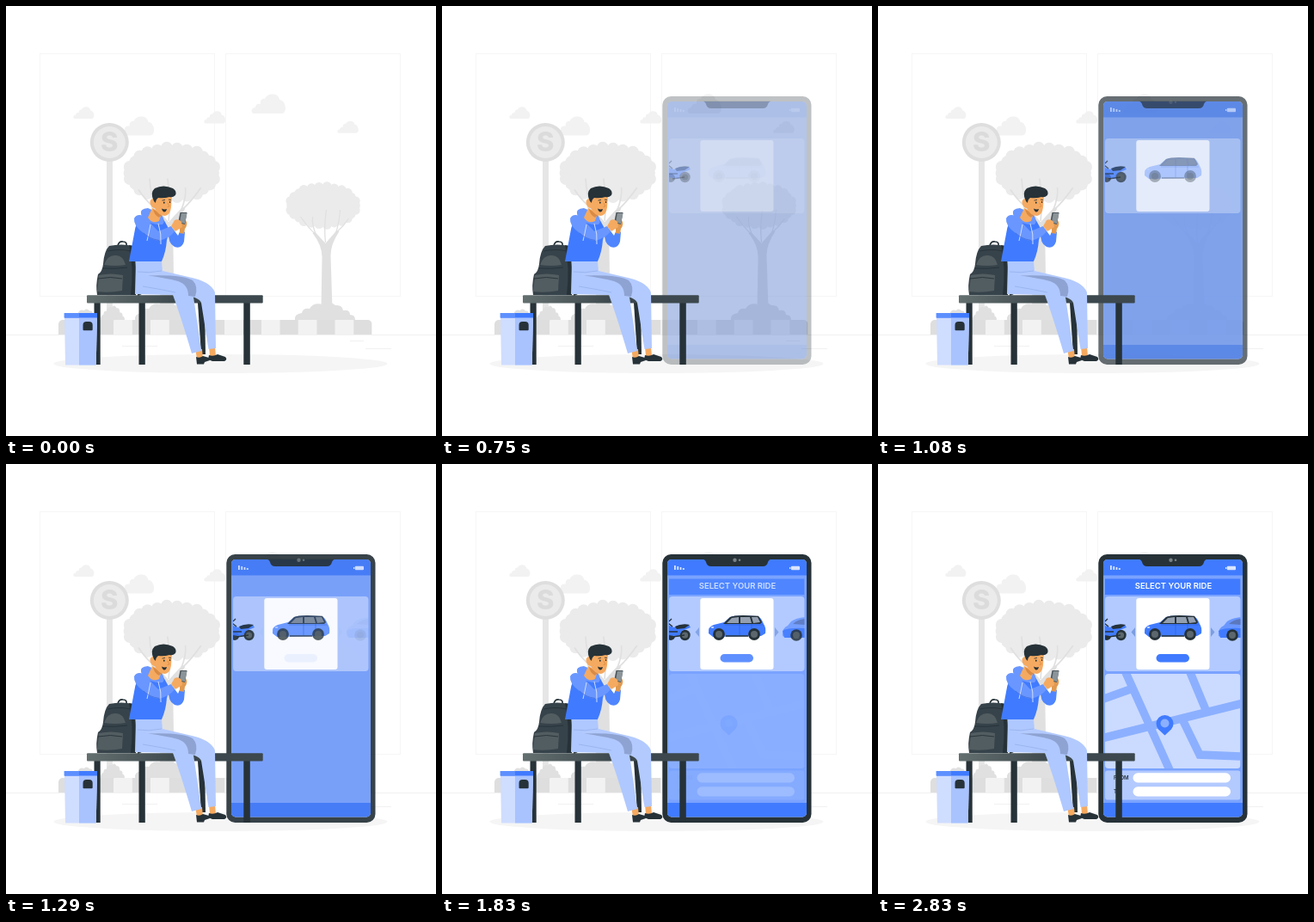
An HTML page with a canvas that plays this animation: 500 px wide and 500 px high, repeating every 3000 ms.

```html
<!DOCTYPE html>
<html lang="en">
<head>
<meta charset="utf-8">
<title>Select your ride</title>
<style>
  html, body { margin: 0; width: 100%; height: 100%; overflow: hidden; background: #fff; }
  canvas { display: block; width: 500px; height: 500px; }
</style>
</head>
<body>
<canvas id="stage"></canvas>
<script>
const LOOP = 3000;
const BLUE = '#407BFF', MID = '#6A97FF', PALE = '#B3CAFF', ROAD = '#8CB0FF';
const DARK = '#263238', SKIN = '#F5AA61', GREY = '#E0E0E0', LIGHT = '#EBEBEB';

const canvas = document.getElementById('stage');
const ctx = canvas.getContext('2d');
const ratio = window.devicePixelRatio || 1;
canvas.width = canvas.height = 500 * ratio;

function fill(path, color) {
  ctx.fillStyle = color;
  ctx.fill(new Path2D(path));
}

function line(path, color, width = 1) {
  ctx.strokeStyle = color;
  ctx.lineWidth = width;
  ctx.stroke(new Path2D(path));
}

// Rounded box given by its edges.
function box(left, top, right, bottom, color, radius = 0) {
  ctx.fillStyle = color;
  ctx.beginPath();
  ctx.roundRect(left, top, right - left, bottom - top, radius);
  ctx.fill();
}

function oval(x, y, rx, color, ry = rx) {
  ctx.fillStyle = color;
  ctx.beginPath();
  ctx.ellipse(x, y, rx, ry, 0, 0, 2 * Math.PI);
  ctx.fill();
}

function text(string, x, y, size, color, weight = 600, align = 'center') {
  ctx.font = `${weight} ${size}px Inter, sans-serif`;
  ctx.textAlign = align;
  ctx.fillStyle = color;
  ctx.fillText(string, x, y);
}

function at(x, y, sx, sy, draw) {
  ctx.save();
  ctx.translate(x, y);
  ctx.scale(sx, sy);
  draw();
  ctx.restore();
}

function progress(t, start, end) {
  return Math.min(1, Math.max(0, (t - start) / (end - start)));
}

// Halfway between linear and smoothstep.
function ease(x) {
  return (x + x * x * (3 - 2 * x)) / 2;
}

function cloud(x, y, scale) {
  at(x, y, scale, scale, () => fill(
    'M3 23C-1 22 0 16 5 16C5 12 9 11 11 12C10 7 14 5 16 6C18 -1 32 -2 33 7C40 7 43 22 36 23Z',
    '#F2F2F2'));
}

function bush(x, y, sx, sy) {
  at(x, y, sx, sy, () => fill(
    'M0 21Q-1 14 8 13Q9 7 17 8Q21 0 33 3Q40 -2 47 4Q55 3 56 10Q64 9 64 15Q70 15 70 21Z', GREY));
}

function tree(x, y, sx, sy) {
  at(x, y, sx, sy, () => {
    oval(0, 0, 39, LIGHT, 24);
    for (let i = 0; i < 26; i++) {
      const angle = i / 26 * 2 * Math.PI;
      const wobble = 1 + 0.03 * Math.sin(i * 2.3);
      oval(38 * wobble * Math.cos(angle), 22 * wobble * Math.sin(angle), 5.4, LIGHT);
    }
    fill('M-2 120L-1 60Q-1 46 -12 32L-9 31L3 44L16 29L19 30Q9 45 9 58L11 120Z', GREY);
    line('M-9 33Q-17 26 -26 13M-8 34Q-13 22 -12 13M3 43Q1 25 4 5M15 32Q19 20 20 5M17 30Q24 24 30 15',
      GREY, 1.3);
  });
}

function background() {
  ctx.strokeStyle = '#F6F6F6';
  ctx.lineWidth = 1;
  ctx.strokeRect(39.5, 55.5, 203, 282);
  ctx.strokeRect(255.5, 55.5, 203, 282);
  line('M0 382.5H500M400 389.5H416M135 395.5H176M418 398.5H448', '#EEEEEE', 0.8);
  cloud(78, 117, 0.61);
  cloud(133, 128, 0.98);
  cloud(230, 122, 0.63);
  cloud(285, 102, 1);
  cloud(385, 133.5, 0.62);

  tree(193, 194, -1.3, 1.3);
  tree(368.5, 232, 1, 1);
  bush(336, 344, 1, 1);
  bush(150, 344, 0.95, 1);
  bush(76, 352, 0.45, 0.65);
  box(117, 178, 124, 365, '#E6E6E6');
  bush(110, 348, 0.4, 0.85);
  oval(120.3, 158.5, 22.5, '#DEDEDE');
  oval(120.3, 158.5, 18.5, '#EBEBEB');
  text('S', 120.3, 169.4, 31, '#DBDBDB', 800);

  ctx.save();
  ctx.beginPath();
  ctx.roundRect(61, 365, 364.5, 17, [5, 5, 0, 0]);
  ctx.clip();
  for (let i = 0; i < 17; i++) {
    box(61 + i * 21.45, 365, 82.5 + i * 21.45, 382, i % 2 ? '#F2F2F2' : '#DEDEDE');
  }
  ctx.restore();
  oval(249.5, 416, 194, '#F5F5F5', 11);
}

function wheel(x, y, r) {
  oval(x, y, r, DARK);
  oval(x, y, r * 0.58, '#5C676D');
}

function car() {
  fill('M310 197Q309 189 316 187L328 184L335 178Q338 176.3 350 176.2L367 177Q371 178 374 186Q377 190 376 197L371 200L315 201Z', BLUE);
  fill('M327 186L335 178Q339 176 350 176L368 176.7L372 184L370 186Z', DARK);
  fill('M331 185L337 179L345 178V185ZM347 178H358L360 185H347ZM360 178H367L370 184L362 185Z', '#94A0B0');
  line('M346 186V199M360 186V195M329 187H373', '#2D5FD0', 0.6);
  line('M330 200H356', DARK, 1.4);
  oval(314.5, 190, 1.8, '#C8D8FF', 1.1);
  wheel(322, 198, 6.9);
  wheel(363, 198, 6.9);
}

function motorbike() {
  wheel(282.5, 199, 6.2);
  oval(266, 200, 5, DARK);
  fill('M264 188L270 190Q275 186 287 187L289 190L279 194L275 201L264 199Z', BLUE);
  fill('M271 189Q279 185 288 187L282 191L273 192Z', DARK);
  line('M263 185L268 189M264 183L267 180', DARK, 1.3);
  line('M268 201L282 199M264 195H274', DARK, 1.6);
}

function nextCar() {
  fill('M396 200Q395 191 402 188L406 183Q412 179 423 178V202H400Z', MID);
  fill('M408 186Q413 181 423 180V187Z', '#5B78BD');
  fill('M396 194Q402 190 423 191V202H398Z', BLUE);
  wheel(412, 199, 6.8);
}

function map() {
  ctx.save();
  ctx.beginPath();
  ctx.roundRect(264, 244, 157.5, 110, 4);
  ctx.clip();
  box(264, 244, 422, 354, '#CBDAFF');
  line('M260 319L425 278M260 274L296 261M286 238L341 360M362 240L382 288M354 297L374 338L425 340',
    ROAD, 9.5);
  ctx.restore();
  fill('M333.5 315.5L326 308.5A10 10 0 1 1 341 308.5Z', BLUE);
  oval(333.5, 301.5, 5, ROAD);
}

function phone(t) {
  const body = ease(progress(t, 420, 1420));
  const controls = ease(progress(t, 1200, 2000));
  const title = ease(progress(t, 1350, 2050));
  const details = progress(t, 1650, 2600);
  const labels = progress(t, 1800, 2800);
  if (!body) return;

  ctx.save();
  ctx.globalAlpha = body;
  const ring = new Path2D();
  ring.roundRect(256.3, 105, 173.2, 312, 10);
  ring.roundRect(262, 111, 162, 299.5, 5);
  ctx.fillStyle = DARK;
  ctx.fill(ring, 'evenodd');
  box(262, 111, 424, 410.5, '#7D8488', 5);
  box(262, 111, 424, 410.5, BLUE, 5);
  box(262, 129.5, 424, 394, 'rgba(255,255,255,.3)');
  fill('M303 110.8Q306 111 307 114Q308 119 313 119H373Q378 119 379 114Q380 111 383 110.8Z', DARK);
  for (let i = 0; i < 4; i++) {
    box(270 + i * 3.3, 118 + i, 271.8 + i * 3.3, 123, '#D9E5FF');
  }
  box(405.8, 118.7, 416, 123.2, '#D9E5FF', 1);
  box(404, 120, 405.3, 122, '#D9E5FF');
  box(264, 154, 421.5, 241, 'rgba(255,255,255,.42)', 4);
  box(300.3, 156, 385.5, 239, '#fff', 3);

  ctx.beginPath();
  ctx.rect(264, 105, 157.5, 312);
  ctx.clip();
  motorbike();

  ctx.globalAlpha = body ** 3;
  car();
  oval(340.5, 111.8, 2.2, '#7A8286');
  oval(346, 111.8, 1.3, '#7A8286');

  ctx.globalAlpha = controls;
  nextCar();
  box(323.5, 221, 362, 230.5, BLUE, 5);
  fill('M299 190V201L294.5 195.5ZM387 190V201L391.5 195.5Z', '#7C9DE0');

  ctx.globalAlpha = title;
  box(264, 133.5, 421.5, 152, BLUE);
  text('SELECT YOUR RIDE', 343.5, 145.4, 9.5, '#fff');

  ctx.globalAlpha = details;
  map();
  box(264, 356.5, 421.5, 390.5, PALE, 3);
  box(296.5, 359.3, 410, 370.5, '#fff', 6);
  box(296.5, 375.3, 410, 386.5, '#fff', 6);

  ctx.globalAlpha = labels;
  text('FROM', 274, 367, 6, DARK, 600, 'left');
  text('TO', 274, 382.7, 6, DARK, 600, 'left');
  ctx.restore();
}

function bench() {
  box(102.5, 345, 109.7, 417, DARK);
  box(154.5, 345, 161.8, 417, DARK);
  box(276.3, 345, 283.8, 417, DARK);
  fill('M223 345H231L232 405H227Z', DARK);
  const seat = ctx.createLinearGradient(94, 0, 200, 0);
  seat.addColorStop(0, '#646F6F');
  seat.addColorStop(1, '#3C484D');
  box(94, 336.3, 298.7, 345.6, seat, 1);
}

function bin() {
  fill('M68 361H106L104.7 417.5H69Z', '#CFDDFF');
  fill('M85 361H106L104.7 417.5H85Z', '#A9C3FF');
  box(67.8, 357, 106, 362.5, BLUE);
  box(67.8, 357, 85, 362.5, '#5D8FFF');
  box(89.5, 367, 100.7, 377.3, DARK, [4, 4, 1, 1]);
}

function backpack() {
  line('M130 279Q131 273.5 136 274Q141 274 140 279', DARK, 1.7);
  fill('M120 279Q134 276 148 279Q152 300 151 336H106Q104 325 107 312Q112 309 113 300Q114 285 120 279Z', '#37434A');
  fill('M143 278L148 279Q152 300 151 336H145Q149 304 143 278Z', DARK);
  fill('M114 301Q118 289 128 290Q136 290 139 301Q127 303 114 301Z', '#525D61');
  fill('M108 313Q122 310 136 313L135 331Q120 334 106 332Z', '#525D61');
  line('M118 285Q133 282 145 285M107 317Q122 314 135 317M112 305Q127 306 141 304', DARK, 0.9);
  line('M149 280Q152 300 157 318Q162 335 153 335.5', DARK, 2.4);
}

function legs() {
  fill('M220 398L228 399L229 410L222 410ZM236 396H243L244 407H237Z', SKIN);
  fill('M160 297H181L182 308L212 315Q238 320 243 333L244 398L235.5 399L227 345Q224 338 205 336L152 330Z', PALE);
  fill('M151 297L150 335L194 336Q203 360 216 404L227 401Q222 365 219 345Q217 326 205 320Q185 315 160 312L181 308V297Z', '#AFC8FF');
  fill('M165 313.5Q205 312 217 319Q224 326 220 338L212 337Q212 324 200 320Q185 316 165 313.5Z', '#8FA3D2');
  line('M153 309Q166 311 181 308M159 326Q178 329 197 333', '#92AEE8', 0.7);
  fill('M221 408Q225 410 229 407L236 409L237 412L231 414L230 416.5H222Z', DARK);
  fill('M236 406Q241 408 246 405L255 408Q258 411 254 413H240L235 411Z', DARK);
}

function person() {
  legs();
  fill('M189 262Q188 276 196 280Q204 283 207 274L208 263L203 260L200 267L194 259Z', '#4F86FF');
  fill('M158 244Q151 250 149 265L143 297H181Q186 286 187 272L190 262Q185 248 178 243Z', BLUE);
  fill('M157 242Q155 236 165 235L172 238L181 243Q186 250 182 254Q170 255 160 248Z', MID);
  fill('M170 235L165 246Q170 254 178 250L181 241Z', SKIN);
  fill('M171 236L181 243L178 246Q172 243 171 236Z', '#D98B45');
  fill('M171 224Q166 225 168 231Q170 235 173 235Q177 244 185 244Q191 243 192 234L193 220Q180 216 172 221Z', SKIN);
  fill('M172 227Q167 217 173 212Q183 207 194 212Q199 215 197 220Q194 223 190 222Q184 224 177 223Q174 225 174 229Z', DARK);
  oval(183.8, 228.7, 0.9, DARK, 1.1);
  oval(190.6, 228, 0.8, DARK, 1.1);
  line('M181.5 226.2L185 225.3M189 225.2L192 225.5', DARK, 0.8);
  line('M188 229L190 233L187.5 233.5', '#D98B45', 0.8);
  fill('M181 235.5Q184 237 187 236Q186 240 183.5 239.5Q181.5 238.5 181 235.5Z', DARK);

  fill('M149 247Q152 241 160 244L177 262L192 256L196 262Q190 270 178 273Q167 272 160 264Q148 256 149 247Z', MID);
  line('M168 254Q166 265 164 273M177 253Q181 265 180 277', '#DCE6FF', 0.9);
  line('M160 264Q167 271 178 272.5', '#345FCC', 0.6);
  fill('M202 252L209 249Q212 254 208 259L207 265L202 264Z', '#E09A50');
  fill('M202.5 240H210.5L208 254L200 252Z', '#4B565C');
  fill('M203.8 241H210.5L208 253L202 251.5Z', '#8B9498');
  fill('M192 256L196 249Q201 247 204 251L205 257L197 262Z', SKIN);
}

function frame() {
  const t = performance.now() % LOOP;
  ctx.setTransform(ratio, 0, 0, ratio, 0, 0);
  ctx.globalAlpha = 1;
  ctx.fillStyle = '#fff';
  ctx.fillRect(0, 0, 500, 500);
  background();
  phone(t);
  bench();
  bin();
  backpack();
  person();
  requestAnimationFrame(frame);
}

frame();
</script>
</body>
</html>
```
